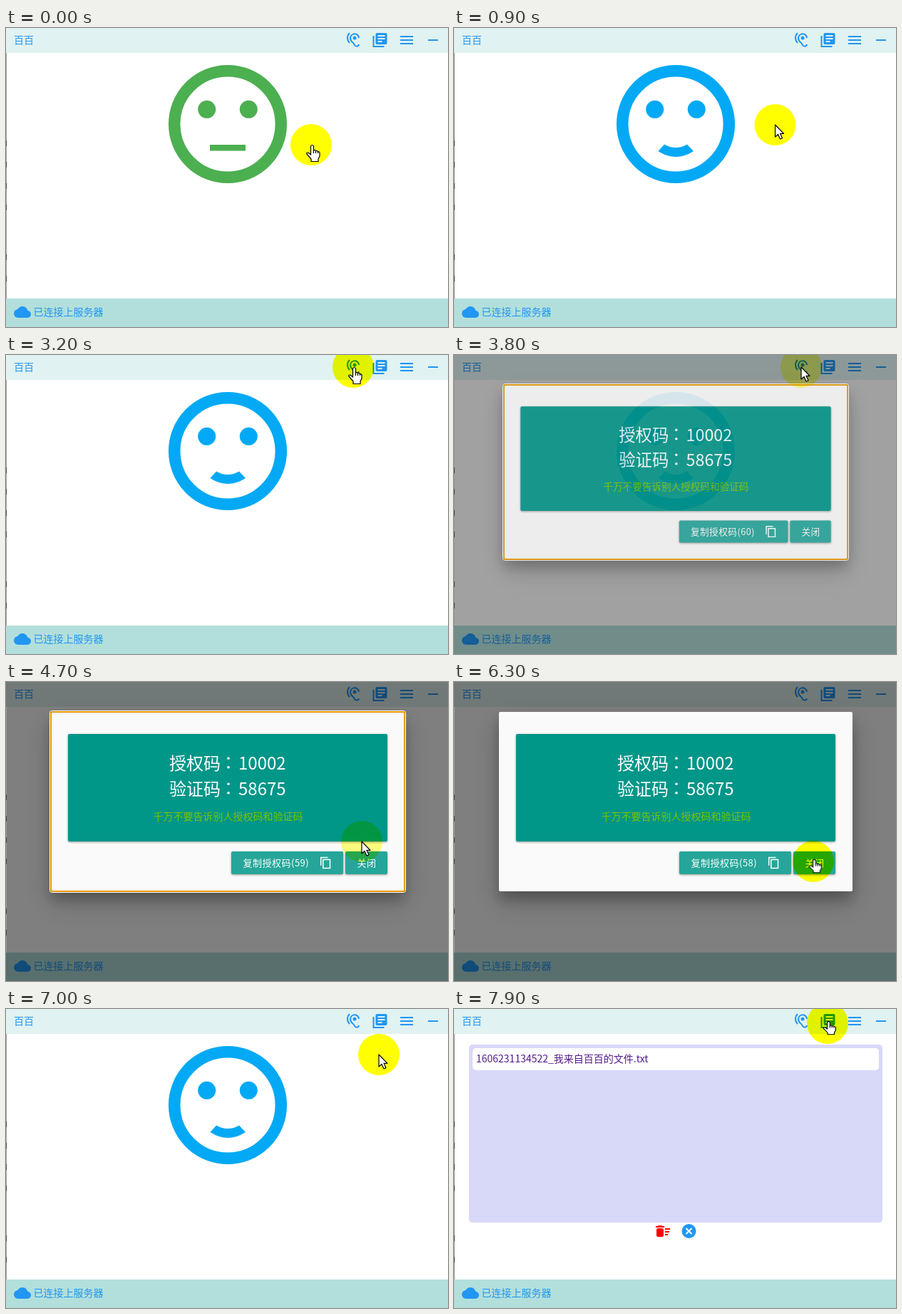
An HTML page that plays this animation: 620x420 px, repeating every 8000 ms.

```html
<!DOCTYPE html>
<html lang="zh-CN">
<head>
<meta charset="utf-8">
<style>
html, body { margin: 0; width: 100%; height: 100%; overflow: hidden; background: #fff }
svg { display: block; width: 620px; height: 420px; isolation: isolate }
text { font: 14px "Noto Sans CJK SC", "Noto Sans CJK", "Noto Sans", sans-serif; white-space: pre }
.blue { fill: #2196f3; color: #2196f3 }
.line { fill: none; stroke: currentColor; stroke-width: 2 }
.big { font-size: 24px; fill: #fff }
.btn { font-size: 13px; letter-spacing: .5px; fill: #fff }
.raised { filter: drop-shadow(0 1px 1.5px rgba(0,0,0,.4)) }
#sheet { filter: drop-shadow(0 12px 9px rgba(0,0,0,.22)) drop-shadow(0 14px 18px rgba(0,0,0,.2)) }
#spot { mix-blend-mode: multiply }
#cursor path { fill: #fff; stroke: #000; stroke-width: 1.2; stroke-linejoin: round }
</style>
</head>
<body>
<svg viewBox="0 0 620 420">
  <rect width="620" height="420" fill="#fff"/>
  <rect width="620" height="35" fill="#e0f2f1"/>
  <rect y="380" width="620" height="40" fill="#b2dfdb"/>
  <g class="blue">
    <text x="11" y="22">百百</text>
    <text x="38.5" y="404">已连接上服务器</text>
    <g transform="translate(475 5)">
      <path class="line" d="M6.900 2a10 10 0 0 0 0 14M20 9A6 6 0 1 0 8.700 12C10.500 16 12.500 15 13.500 18S19 22 20 18"/>
      <circle cx="14" cy="9" r="2.5"/>
    </g>
    <g transform="translate(512.5 5)">
      <path class="line" d="M3 6v15h15"/>
      <rect x="6" y="2" width="16" height="16" rx="2"/>
      <path class="line" color="#e0f2f1" d="M9 6h10M9 10h10M9 14h6"/>
    </g>
    <path class="line" d="M553 12h18m-18 5h18m-18 5h18M592 17h14"/>
    <g transform="translate(11 387)">
      <circle cx="6" cy="14" r="6"/>
      <circle cx="12" cy="11.5" r="7.5"/>
      <circle cx="19" cy="15" r="5"/>
      <rect x="6" y="12" width="13" height="8"/>
    </g>
  </g>

  <g id="face">
    <circle class="line" cx="311" cy="135" r="74.8" style="stroke-width:16.5"/>
    <g fill="currentColor">
      <circle cx="281.7" cy="114.3" r="12.5"/>
      <circle cx="340.3" cy="114.3" r="12.5"/>
      <path id="mouth"/>
    </g>
  </g>

  <g id="files">
    <rect x="21" y="50" width="580" height="250" rx="5" fill="#d8d8f9"/>
    <rect x="26" y="55" width="570" height="31" rx="5" fill="#fff"/>
    <text x="31" y="75" fill="#551a8b">1606231134522_我来自百百的文件.txt</text>
    <g transform="translate(281 300)" color="red" fill="red">
      <path class="line" d="M2 6h12M5 5h6M15 9h7m-7 4h6m-6 4h4"/>
      <rect x="3" y="8" width="10" height="12" rx="2"/>
    </g>
    <circle class="blue" cx="329.5" cy="312" r="10"/>
    <path class="line" color="#fff" d="m325.500 308 8 8m0-8-8 8"/>
  </g>

  <rect id="shade" width="620" height="420"/>
  <g id="modal">
    <rect id="sheet" x="63" y="42" width="496" height="252" rx="2" fill="#fafafa"/>
    <g id="ring" fill="none">
      <rect x="61.5" y="40.5" width="499" height="255" rx="3" stroke="#fff"/>
      <rect x="63" y="42" width="496" height="252" rx="2" stroke="#e59700" stroke-width="2"/>
    </g>
    <rect class="raised" x="87" y="73" width="448" height="151" rx="2" fill="#009688"/>
    <text class="big" x="229" y="123">授权码<tspan dx="5" dy="-2">：</tspan><tspan dx="-4" dy="2">10002</tspan></text>
    <text class="big" x="229" y="159">验证码<tspan dx="5" dy="-2">：</tspan><tspan dx="-4" dy="2">58675</tspan></text>
    <text x="206.5" y="194" fill="#7cc400">千万不要告诉别人授权码和验证码</text>
    <g class="raised" fill="#26a69a">
      <rect x="316" y="238" width="157" height="32" rx="2"/>
      <rect x="476" y="238" width="59" height="32" rx="2"/>
    </g>
    <text class="btn" id="copy" x="332.5" y="259"></text>
    <text class="btn" x="492.5" y="259">关闭</text>
    <path class="line" color="#fff" transform="translate(439.5 245) scale(.75)" d="M3 17V2h13M7 6h13v16H7z"/>
  </g>

  <path d="M.5 35V380" stroke="#999"/>
  <path d="M.5 158V262M.5 318V360" stroke="#444" stroke-dasharray="8 22"/>

  <circle id="spot" r="29" fill="#ff0"/>
  <g id="cursor">
    <path id="arrow" d="M0 0v17l4-3.500 3 6.500 3-1.300-3-6.400h5z"/>
    <g id="hand">
      <path d="M-.5 2Q1.500-1 3.500 2v6q2-1.500 3 .7 2-1 3 .9 2.300-.3 2.500 1.800V16l-2 4v3.500H0V20l-6-7q-.8-2.700 2.300-1.700l3.200 2.700z"/>
      <path d="M3.500 8v4m3-3.300V12m3-2.400V12"/>
    </g>
  </g>
</svg>
<script>
const $ = id => document.getElementById(id);
const clamp = v => Math.min(1, Math.max(0, v));
const easeOut = (t, start, length) => 1 - (1 - clamp((t - start) / length)) ** 2;
const smooth = v => v * v * (3 - 2 * v);
const show = (id, on) => $(id).style.display = on ? '' : 'none';

const FLAT = 'M286 164h50v8.5h-50z';
const SMILE = 'M295 163.5Q311 172.5 327 163.5L336 173Q311 189 286.5 173z';

// Pointer moves: start, end, x, y
const moves = [
  [600, 1500, 515, 56], [1500, 1600, 500, 23], [1600, 2200, 505, 19],
  [3000, 3200, 487, 17], [4100, 4700, 499, 224], [4700, 5400, 505, 258],
  [5600, 6100, 504, 252], [6300, 7000, 523, 64], [7000, 7400, 524, 20]
];

function pointer(t) {
  return moves.reduce(([x, y], [start, end, toX, toY]) => {
    const k = smooth(clamp((t - start) / (end - start)));
    return [x + (toX - x) * k, y + (toY - y) * k];
  }, [428, 164]);
}

function drawModal(t) {
  const open = easeOut(t, 3550, 400) - easeOut(t, 6300, 350);
  show('modal', open > 0);
  show('ring', t < 6300);
  $('modal').style.opacity = open;
  $('modal').setAttribute('transform',
    `translate(311 ${143 + 25 * open}) scale(${.8 + .2 * open}) translate(-311 -168)`);
  $('shade').style.opacity = .5 * open * open;
  $('copy').textContent = `复制授权码(${t < 4600 ? 60 : t < 5700 ? 59 : 58})`;
}

function drawPointer(t) {
  const [x, y] = pointer(t);
  const covered = t >= 3600 && t < 6400;
  const hand = t < 700 || (covered ? y > 238 : y < 35);
  const pressed = t >= 5700 && t < 6400 || t >= 7500;
  for (const id of ['spot', 'cursor']) $(id).setAttribute('transform', `translate(${x} ${y})`);
  $('spot').style.opacity = covered && !hand ? .5 : 1;
  show('arrow', !hand);
  show('hand', hand);
  $('hand').setAttribute('transform', pressed ? 'translate(0 -3) scale(.95 .8)' : '');
}

function draw(t) {
  const happy = t >= 400;
  $('face').style.color = happy ? '#03a9f4' : '#4caf50';
  $('mouth').setAttribute('d', happy ? SMILE : FLAT);
  $('files').style.opacity = easeOut(t, 7550, 350);
  drawModal(t);
  drawPointer(t);
}

const begin = performance.now();
function tick() {
  draw(Math.floor((performance.now() - begin) % 8000 / 100) * 100);
  requestAnimationFrame(tick);
}
tick();
</script>
</body>
</html>
```
